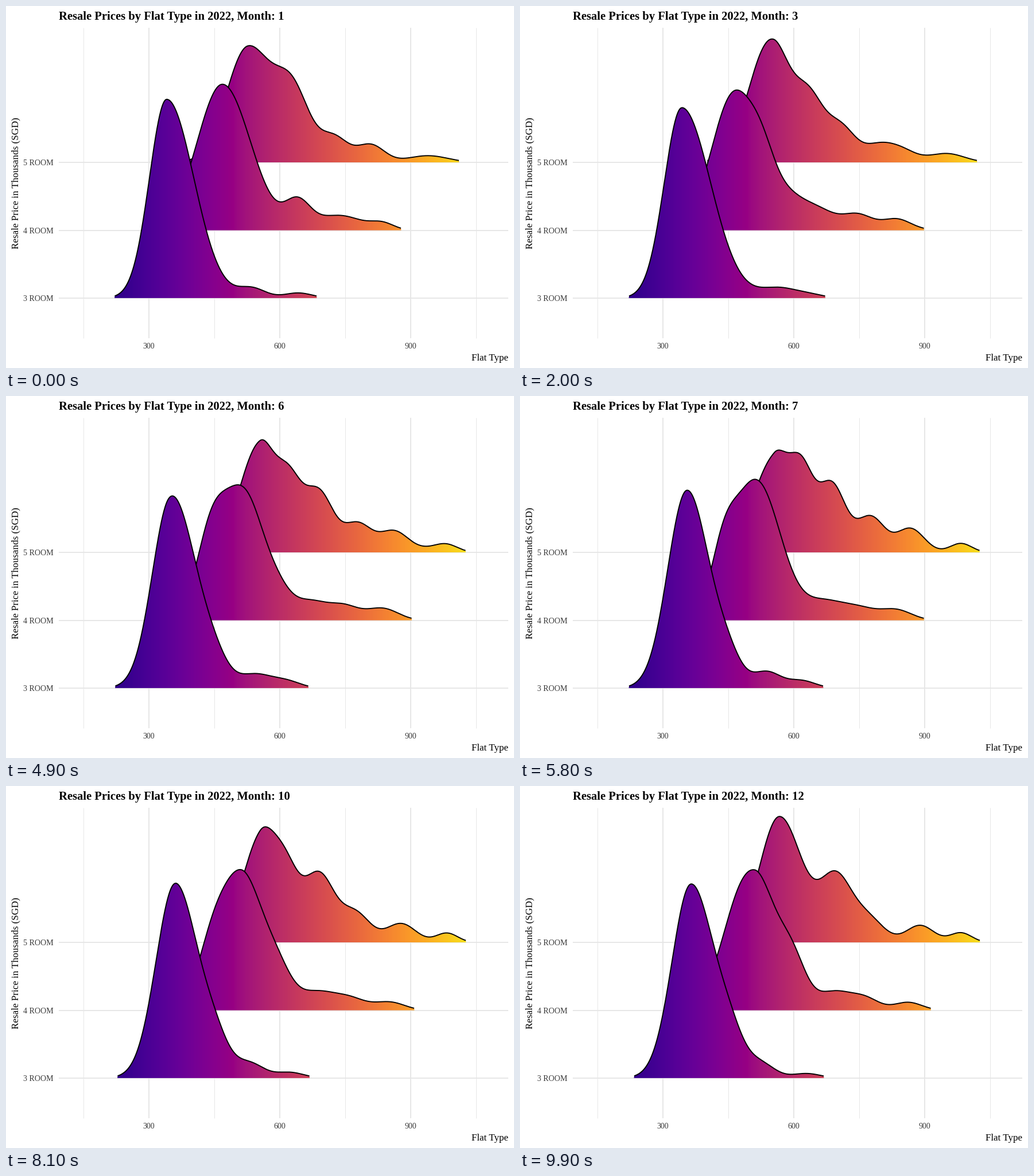
Recreate the animation shown at these times as a matplotlib script. Size 885 px wide and 632 px high, loop 10 s.

```python
import numpy as np
import matplotlib.pyplot as plt
from matplotlib.animation import FuncAnimation
from matplotlib.patches import Polygon

W, H, DPI = 885, 632, 100
FRAMES, INTERVAL = 100, 100
PX = 72 / DPI                      # one pixel in points
LEFT, RIGHT, TOP, BOTTOM = 91.5, 875, 38, 580
ROOMS = ("3 ROOM", "4 ROOM", "5 ROOM")
BASE, GAP = 509.9, 118.3
MIN_HEIGHT = 3.6
X = np.arange(127, 840, 0.5)

plt.rcParams["font.family"] = "Liberation Serif"


# --- ridges: one lopsided hill plus a few small bumps, in pixels ---
def bell(x, w):
    return np.exp(-((X - x) / w)**2 / 2)


def ridge(peak, height, rise, fall, *bumps):
    """Hill with separate widths to each side; bumps are (x, height[, width])."""
    hill = height * bell(peak, np.where(X < peak, rise, fall))
    return hill + sum(h * bell(x, *(w or (24,))) for x, h, *w in bumps)


SHAPES = {
    1: (
        ridge(280, 347, 30, 47, (428, 17), (509, 9)),
        ridge(377, 255, 44, 49, (508, 46, 22), (580, 26, 40), (656, 11, 20)),
        ridge(421, 200, 37, 42, (500, 115, 30), (572, 42), (635, 31),
              (735, 12, 35))),
    4.9: (
        ridge(283.5, 322, 31, 53, (457, 21), (490, 8)),
        ridge(370, 224, 35, 34, (424, 122), (473, 68), (533, 29), (588, 30),
              (658, 24, 27)),
        ridge(441, 228, 33, 28, (505, 100), (555, 76), (618, 30), (666, 32),
              (745, 19, 30))),
    7.4: (
        ridge(291, 345, 33.5, 38, (362, 42), (430, 28), (490, 13)),
        ridge(412, 243, 40, 42, (354, 88, 22), (530, 30, 32), (590, 20, 30),
              (655, 18, 27)),
        ridge(443, 163, 36, 24, (490, 136, 21), (543, 118), (611, 62),
              (680, 42), (768, 16, 19))),
    12: (
        ridge(298, 338, 33, 40, (367, 52), (420, 24), (499, 8)),
        ridge(409, 237, 46, 36, (373, 20), (475, 75), (548, 32, 30), (602, 19),
              (676, 14)),
        ridge(452, 220, 34.5, 40, (550, 108, 27), (605, 42, 28), (697, 30),
              (768, 17, 19))),
}
MONTHS = list(SHAPES)


def heights(month):
    a, b = next(p for p in zip(MONTHS, MONTHS[1:]) if month <= p[1])
    t = (month - a) / (b - a)
    return [(1 - t) * p + t * q for p, q in zip(SHAPES[a], SHAPES[b])]


# --- plasma colours as seen through a gamma 1.8 "generic RGB" display ---
def to_xyz(primaries):
    m = np.array([(x / y, 1, (1 - x - y) / y) for x, y in primaries]).T
    return m * np.linalg.solve(m, [0.9505, 1, 1.089])


def display(rgb):
    rgb = np.asarray(rgb)
    linear = np.where(rgb <= 0.04045, rgb / 12.92, ((rgb + 0.055) / 1.055)**2.4)
    srgb = to_xyz([(0.64, 0.33), (0.30, 0.60), (0.15, 0.06)])
    generic = to_xyz([(0.63, 0.34), (0.295, 0.605), (0.155, 0.077)])
    out = linear @ np.linalg.solve(generic, srgb).T
    return np.clip(out, 0, 1)**(1 / 1.8)


gradient = display(plt.get_cmap("plasma")(np.linspace(0, 1, 512))[:, :3])[None]
GRID = display([0.92] * 3)
TICK = display([0.30] * 3)

# --- stage ---
fig = plt.figure(figsize=(W / DPI, H / DPI), dpi=DPI, facecolor="white")
ax = fig.add_axes([0, 0, 1, 1])
ax.axis("off")


def label(x, y, s, size, **kw):
    return ax.text(x, y, s, fontsize=size * PX, **kw)


def rule(xs, ys, width):
    ax.plot(xs, ys, color=GRID, lw=width * PX, solid_capstyle="butt", zorder=1)


for price in range(150, 1051, 150):
    x = 20.5 + 0.76 * price
    major = price % 300 == 0
    rule([x, x], [TOP, BOTTOM], 1.9 if major else 1)
    if major:
        label(x, 598.5, str(price), 14, ha="center", color=TICK)

title = label(LEFT, 24, "", 20.6, weight="bold")
label(RIGHT, 619, "Flat Type", 17, ha="right")
label(21, 309.5, "Resale Price in Thousands (SGD)", 17, rotation=90,
      ha="center", va="baseline", rotation_mode="anchor")

ridges = []
for n, room in enumerate(ROOMS):
    base, z = BASE - n * GAP, 10 - 2 * n
    rule([LEFT, RIGHT], [base, base], 1.9)
    label(83, base + 5, room, 14, ha="right", color=TICK)
    fill = ax.imshow(gradient, extent=(127, 840, base, 0), aspect="auto",
                     interpolation="bilinear", zorder=z)
    clip = Polygon([(0, 0), (1, 1), (1, 0)], transform=ax.transData)
    line, = ax.plot([], [], color="black", lw=1.9 * PX, zorder=z + 1,
                    solid_capstyle="butt", solid_joinstyle="round")
    ridges.append((base, fill, clip, line))

ax.set_xlim(0, W)
ax.set_ylim(H, 0)


def draw(i):
    month = 1 + 11 * i / (FRAMES - 1)
    title.set_text(f"Resale Prices by Flat Type in 2022, Month: {round(month)}")
    for (base, fill, clip, line), h in zip(ridges, heights(month)):
        shown = h >= MIN_HEIGHT
        top = base - np.where(shown, h, 0)
        clip.set_xy(np.column_stack([np.r_[X, X[-1], X[0]],
                                     np.r_[top, base, base]]))
        fill.set_clip_path(clip)
        line.set_data(X, np.where(shown, base - h, np.nan))
    return [title]


anim = FuncAnimation(fig, draw, frames=FRAMES, interval=INTERVAL,
                     repeat=True, repeat_delay=0, blit=False)
plt.show()
```
